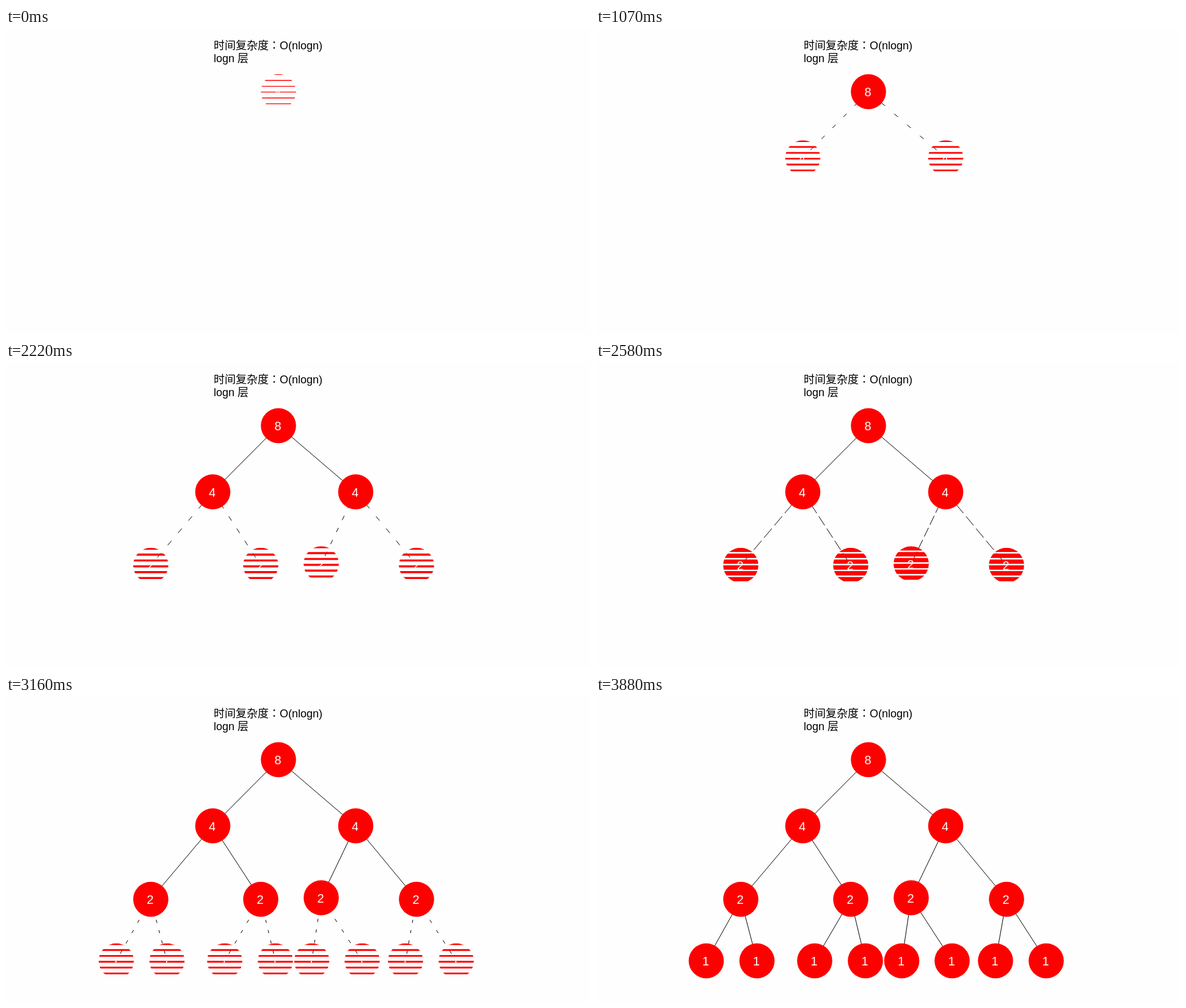
An HTML page with a canvas that plays this animation: 956 by 502 pixels, repeating every 4.58 s.

```html
<!DOCTYPE html>
<html lang="zh-CN">
<head>
<meta charset="utf-8">
<style>
  html, body { margin: 0; width: 100%; height: 100%; overflow: hidden; background: #fefefe; }
  canvas { position: absolute; left: 0; top: 0; }
  p {
    position: absolute; left: 340px; top: 19px; margin: 0; white-space: nowrap; color: #000;
    font: 18px/21px "Liberation Sans", "Noto Sans CJK SC", sans-serif;
  }
</style>
</head>
<body>
<canvas id="stage" width="956" height="502"></canvas>
<p>时间复杂度<span lang="ja">：</span>O(nlogn)<br>logn 层</p>
<script>
const ctx = document.getElementById('stage').getContext('2d');
const LOOP = 4580, REVEAL = 930, RADIUS = 28.8, STRIPS = 6;
const levelStart = [-130, 800, 1890, 2880];

// Node centres in heap order: the parent of i is (i - 1) >> 1.
const nodes = [
  [446, 104.5],
  [338.5, 213], [572.5, 213],
  [237, 333.5], [417, 333.5], [516, 331], [672, 333.5],
  ...[180.5, 263.5, 358, 441, 500.5, 583, 654, 737].map(x => [x, 434.5])
].map(([x, y], i) => ({ x, y, level: Math.floor(Math.log2(i + 1)) }));

// Horizontal blinds: each strip of the box opens downwards.
function blinds(top, height, progress, draw) {
  if (progress <= 0) return;
  ctx.save();
  if (progress < 1) {
    const strip = height / STRIPS;
    ctx.beginPath();
    for (let k = 0; k < STRIPS; k++) ctx.rect(0, top + k * strip, 956, strip * progress);
    ctx.clip();
  }
  draw();
  ctx.restore();
}

function drawLine(from, to) {
  ctx.beginPath();
  ctx.moveTo(from.x, from.y);
  ctx.lineTo(to.x, to.y);
  ctx.stroke();
}

function drawNode({ x, y, level }) {
  ctx.fillStyle = '#f00';
  ctx.beginPath();
  ctx.arc(x, y, RADIUS, 0, 2 * Math.PI);
  ctx.fill();
  ctx.fillStyle = '#fff';
  ctx.fillText(8 >> level, x - 1, y + 7.5);
}

function render(time) {
  const progress = levelStart.map(start => (time - start) / REVEAL);
  ctx.clearRect(0, 0, 956, 502);
  ctx.strokeStyle = '#000';
  ctx.lineWidth = 1;
  ctx.font = '20px "Liberation Sans", sans-serif';
  ctx.textAlign = 'center';
  nodes.forEach((node, i) => {
    if (!i) return;
    const parent = nodes[(i - 1) >> 1];
    blinds(parent.y, node.y - parent.y, progress[node.level], () => drawLine(parent, node));
  });
  for (const node of nodes)
    blinds(node.y - RADIUS, 2 * RADIUS, progress[node.level], () => drawNode(node));
}

const begin = performance.now();
function tick() {
  render((performance.now() - begin) % LOOP);
  requestAnimationFrame(tick);
}
tick();
</script>
</body>
</html>
```
